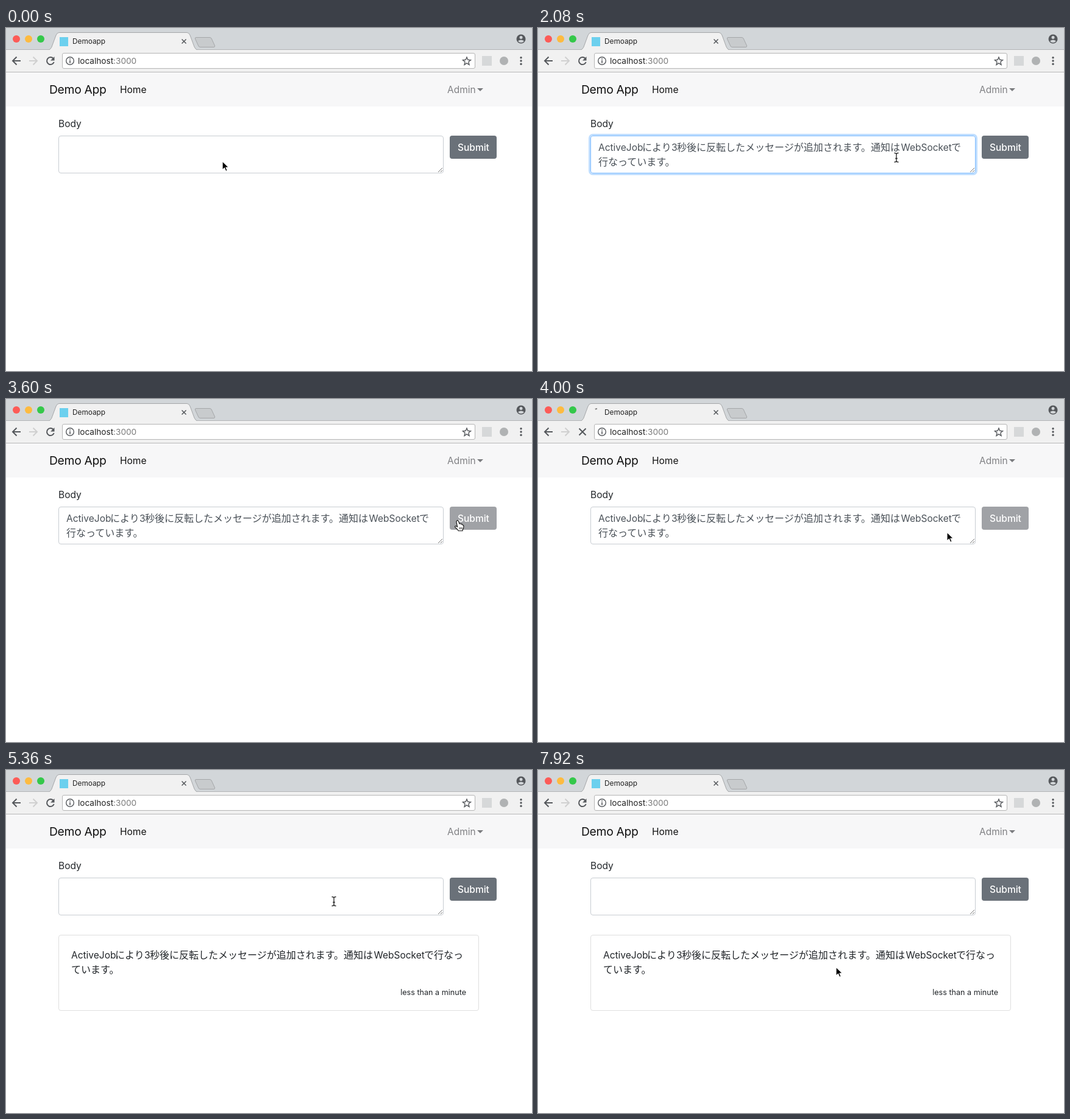
Recreate the animation shown at these times as an HTML page. Size 863 by 564 pixels, loop 8000 ms.

```html
<!DOCTYPE html>
<html lang="ja">
<head>
<meta charset="utf-8">
<title>Demoapp</title>
<style>
html, body { margin: 0; width: 100%; height: 100%; overflow: hidden; background: #fff; }
svg { display: block; }
text { font-family: Inter, "Noto Sans CJK JP", "Noto Sans CJK", sans-serif; font-size: 15.5px; white-space: pre; }
.jp { font-family: "Noto Sans CJK JP", "Noto Sans CJK", sans-serif; font-size: 16px; }
.line { fill: none; stroke: #55585c; stroke-width: 2; }
</style>
</head>
<body>
<svg width="863" height="564" viewBox="0 0 863 564">
  <!-- window and tab strip -->
  <rect width="863" height="36" fill="#d2d6d9"/>
  <path d="M0 35.5H863" stroke="#b2b4b6"/>
  <circle cx="17" cy="18" r="6" fill="#fc5b57"/>
  <circle cx="37" cy="18" r="6" fill="#fdbb40"/>
  <circle cx="57" cy="18" r="6" fill="#34c84a"/>
  <path d="M70 36C73 35 74 33 75 31L82 12Q84 7.500 87 7.500H297Q300 7.500 302 12L309 31Q311 35.500 314 36" fill="#f1f1f1" stroke="#a5a7a9"/>
  <rect y="36" width="863" height="37" fill="#f1f1f1"/>
  <path d="M0 72.500H863" stroke="#b8b8b8"/>
  <path d="M312 15.500H334Q336 15.500 337 17L342.500 29Q343 31.500 341 31.500H319Q317 31.500 316 30L310.500 18Q309.500 15.500 312 15.500Z" fill="#c8cbcd" stroke="#a5a7a9"/>
  <rect id="icon" x="88" y="15" width="14" height="15" fill="#6cd0ee"/>
  <path id="spinner" fill="none" stroke="#858585" stroke-width="2"/>
  <text x="109" y="26" style="font-size:11.800px" fill="#222">Demoapp</text>
  <path d="M288.500 18.500L295.500 25.500M295.500 18.500L288.500 25.500" class="line" style="stroke-width:1.500"/>
  <circle cx="845" cy="18" r="7.500" fill="#55585c"/>
  <circle cx="845" cy="15.500" r="2.500" fill="#d2d6d9"/>
  <path d="M840 21.500Q845 17.500 850 21.500Q848 24 845 24T840 21.500Z" fill="#d2d6d9"/>

  <!-- toolbar -->
  <path id="back" d="M24 54H11M17.500 47.500L11 54L17.500 60.500" class="line"/>
  <path d="M38 54H51M44.500 47.500L51 54L44.500 60.500" class="line" style="stroke:#d0d0d0"/>
  <g id="reload">
    <path d="M77.500 50A6 6 0 1 0 78.700 56" class="line"/>
    <path d="M79.500 47V53.500H73Z" fill="#55585c"/>
  </g>
  <path id="stop" d="M67.500 48.500L78.500 59.500M78.500 48.500L67.500 59.500" class="line"/>
  <rect x="92.500" y="41.500" width="677" height="25" rx="2.500" fill="#fff" stroke="#b5b5b5"/>
  <circle cx="105" cy="54" r="6.300" class="line" style="stroke-width:1.400"/>
  <path d="M105 50V51.700M105 53V57.700" class="line" style="stroke-width:1.600"/>
  <text x="118" y="59" style="font-size:13.600px" fill="#222">localhost<tspan fill="#7a7a7a">:3000</tspan></text>
  <path d="M756 48L757.800 52.300L762.500 52.700L758.900 55.800L760 60.400L756 57.900L752 60.400L753.100 55.800L749.500 52.700L754.200 52.300Z" class="line" style="stroke-width:1.400"/>
  <rect x="781" y="46" width="16" height="16" fill="#d6d8d9"/>
  <circle cx="817" cy="54" r="7" fill="#b0b2b3"/>
  <g fill="#55585c"><circle cx="845" cy="48.800" r="1.700"/><circle cx="845" cy="54" r="1.700"/><circle cx="845" cy="59.200" r="1.700"/></g>

  <!-- page -->
  <rect y="73" width="863" height="56" fill="#f7f7f8"/>
  <text x="71" y="108" style="font-size:19.300px;letter-spacing:-.3px" fill="#111">Demo App</text>
  <text x="187" y="107" fill="#111">Home</text>
  <text x="724" y="107" fill="#808184">Admin</text>
  <path d="M773 99H783L778 104Z" fill="#7b7c7f"/>
  <text x="86" y="163" fill="#212529">Body</text>
  <rect id="ring" x="84.500" y="175.500" width="635" height="65" rx="5.500" fill="none" stroke="#bfdeff" stroke-width="3"/>
  <rect id="field" x="86.500" y="177.500" width="631" height="61" rx="3.500" fill="#fff" stroke="#c8cdd2"/>
  <path d="M709 237L716 230M713 237L716 234" stroke="#777" fill="none"/>
  <g id="draft" fill="#495057"></g>
  <path id="caret" stroke="#333"/>
  <rect id="button" x="728" y="177" width="77" height="38" rx="4"/>
  <text x="741" y="202" fill="#fff" style="font-weight:500">Submit</text>
  <g id="card" fill="#212529">
    <rect x="86.500" y="271.500" width="689" height="124" rx="3.500" fill="#fff" stroke="#dfdfdf"/>
    <text x="755" y="370" text-anchor="end" style="font-size:12.600px">less than a minute</text>
  </g>

  <!-- pointers, each with its hot spot at 0,0 -->
  <g id="arrow"><path d="M0 0V14.500L3.400 11.300L5.700 16.500L8.200 15.400L6 10.400H10.500Z" stroke="#fff" stroke-width="1.200"/></g>
  <g id="beam"><path d="M-3.500 -7.500Q0 -7.500 0 -5.500Q0 -7.500 3.500 -7.500M0 -5.500V5.500M-3.500 7.500Q0 7.500 0 5.500Q0 7.500 3.500 7.500M-1.800 1.500H1.800" fill="none" stroke="#222" stroke-width="1.300"/></g>
  <g id="hand"><path d="M-3 -7.500Q-1.500 -9 -.3 -7.300L1.300 -2.500Q3.300 -3.700 4 -2Q6 -2.500 6.300 -.8Q8.300 -.8 8.300 1.500Q8.500 5 6.500 7.500V9H-.5Q-1.500 6.500 -5.500 3.500Q-7 1.500 -4.800 1L-2 2.500L-3.700 -6Z" fill="#fff" stroke="#111" stroke-width="1.100"/><path d="M1.500 3V6.500M3.500 3V6.500M5.500 3V6.500" stroke="#111" stroke-width=".8"/></g>
</svg>
<script>
const $ = id => document.getElementById(id);
const LOOP = 8000, CLICK = 870, PASTE = 1520, SUBMIT = 3360, LOAD = 3960, DONE = 4380;
// time, x, y
const path = [[0, 355, 219], [80, 355, 219], [760, 407, 198], [1700, 407, 198], [2080, 588, 213],
  [2560, 754, 206], [3480, 754, 206], [4000, 671, 219], [4640, 538, 216], [5600, 538, 216],
  [6400, 489, 324], [LOOP, 489, 324]];

const show = (id, on) => $(id).setAttribute('visibility', on ? 'visible' : 'hidden');
const clamp = v => Math.max(0, Math.min(1, v));

function addRun(parent, x, y, str) {
  const el = document.createElementNS('http://www.w3.org/2000/svg', 'text');
  el.setAttribute('x', x);
  el.setAttribute('y', y);
  if (!/^\w+$/.test(str)) el.setAttribute('class', 'jp');
  el.textContent = str;
  $(parent).append(el);
}

function addMessage(parent, x, y, tail, rest) {
  addRun(parent, x, y, 'ActiveJob');
  addRun(parent, x + 72, y, 'により');
  addRun(parent, x + 120, y, '3');
  addRun(parent, x + 129, y, '秒後に反転したメッセージが追加されます。通知は');
  addRun(parent, x + 496.5, y, 'WebSocket');
  addRun(parent, x + 579, y, tail);
  addRun(parent, x, y + 24, rest);
}
addMessage('draft', 99, 202, 'で', '行なっています。');
addMessage('card', 107, 310, 'で行なっ', 'ています。');

function pointerAt(t) {
  const i = path.findIndex(p => p[0] > t);
  const [t0, x0, y0] = path[i - 1], [t1, x1, y1] = path[i];
  const u = (t - t0) / (t1 - t0), k = u * u * (3 - 2 * u);
  return [x0 + (x1 - x0) * k, y0 + (y1 - y0) * k];
}

function drawPointer(t) {
  const [x, y] = pointerAt(t), busy = t >= SUBMIT && t < DONE;
  const inside = (l, r, top, bottom) => x > l && x < r && y > top && y < bottom;
  let kind = 'arrow';
  if (!busy && t > 200 && inside(86, 718, 177, 239)) kind = 'beam';
  if (inside(728, 805, 177, 215)) kind = 'hand';
  for (const id of ['arrow', 'beam', 'hand']) show(id, id === kind);
  $(kind).setAttribute('transform', `translate(${x} ${y})`);
  return kind === 'hand';
}

function drawSpinner(t) {
  const a = clamp((t - LOAD) / 500) * 5 + .15;
  const x = 97 - 6 * Math.sin(a), y = 22 - 6 * Math.cos(a);
  $('spinner').setAttribute('d', `M97 16A6 6 0 ${a > Math.PI ? 1 : 0} 0 ${x} ${y}`);
}

function draw(t) {
  const hover = drawPointer(t);
  const loading = t >= LOAD && t < DONE, busy = t >= SUBMIT && t < DONE;
  const focused = t >= CLICK && t < SUBMIT, pasted = t >= PASTE;
  const glow = clamp((t - CLICK - 20) / 150) * clamp(1 - (t - SUBMIT) / 150);

  show('icon', !loading);
  show('spinner', loading);
  show('reload', !loading);
  show('stop', loading);
  drawSpinner(t);

  $('ring').setAttribute('opacity', glow);
  $('field').setAttribute('stroke', glow > .5 ? '#80bdff' : '#c8cdd2');
  show('draft', pasted && t < DONE);
  show('card', t >= DONE);
  show('caret', focused && (t - (pasted ? PASTE : CLICK)) % 1000 < 500);
  $('caret').setAttribute('d', pasted ? 'M225.5 211V229' : 'M99.5 187V205');
  $('button').setAttribute('fill', busy ? '#a0a2a6' : hover ? '#5b565d' : '#6a7179');
}

const start = performance.now();
function frame() {
  draw((performance.now() - start) % LOOP);
  requestAnimationFrame(frame);
}
frame();
</script>
</body>
</html>
```
